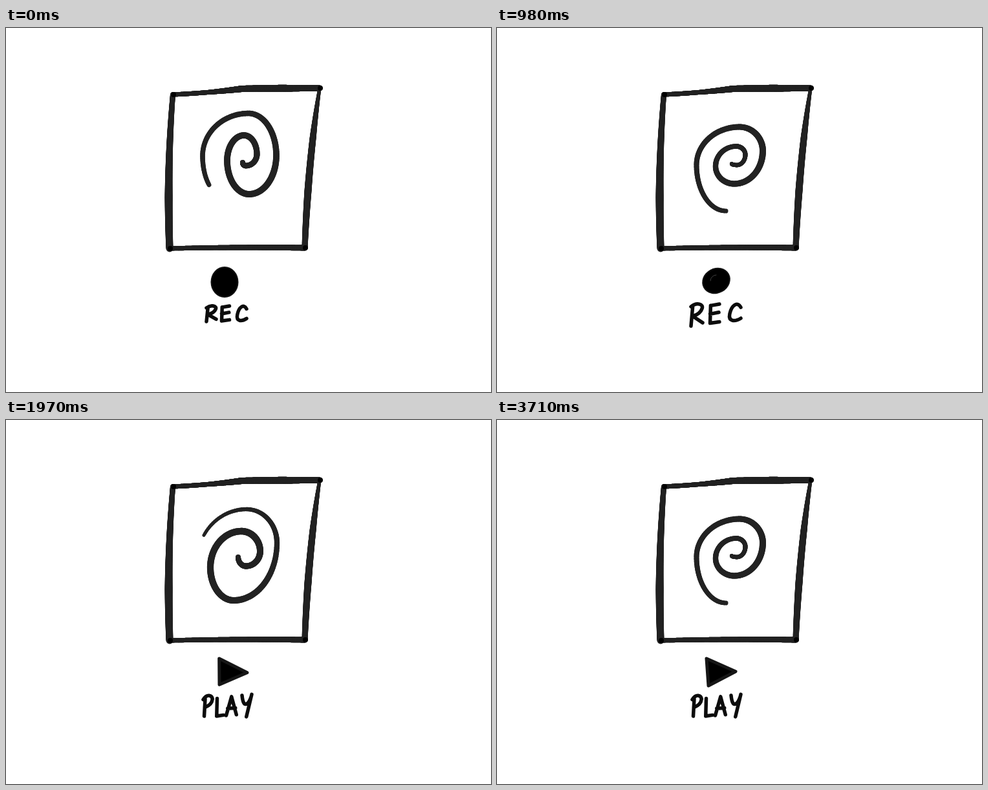
Write an HTML page with a canvas that moves like this. It is 750 px wide and 563 px high and loops after 4000 ms.

```html
<!DOCTYPE html>
<html lang="en">
<head>
<meta charset="utf-8">
<title>Record and play</title>
<style>
  html, body { margin: 0; width: 100%; height: 100%; overflow: hidden; background: #fff; }
  canvas { display: block; }
</style>
</head>
<body>
<canvas id="stage" width="750" height="563" role="img"></canvas>
<script>
const canvas = document.getElementById('stage');
const ctx = canvas.getContext('2d');
const INK = '#222', DARK = '#0c0c0c';
const mix = (a, b, f) => a + (b - a) * f;

// Draws curve(u), u = 0..1, with a line width that eases through the given widths.
function brush(curve, widths) {
  const steps = 240, spans = widths.length - 1;
  ctx.strokeStyle = INK;
  for (let s = 0; s < steps; s++) {
    const p = s / steps * spans, i = Math.floor(p);
    ctx.lineWidth = mix(widths[i], widths[i + 1], p - i);
    ctx.beginPath();
    ctx.moveTo(...curve(s / steps));
    ctx.lineTo(...curve((s + 1) / steps));
    ctx.stroke();
  }
}

function blob(x, y, rx, ry, tilt, color) {
  ctx.fillStyle = color;
  ctx.beginPath();
  ctx.ellipse(x, y, rx, ry, tilt, 0, 2 * Math.PI);
  ctx.fill();
}

// A gently bowed line from a to c that passes through b halfway.
const bow = (a, b, c) => u => [0, 1].map(k =>
  a[k] * (1 - u) * (1 - 2 * u) + b[k] * 4 * u * (1 - u) + c[k] * u * (2 * u - 1));

function drawScreen() {
  const topLeft = [258, 103], topRight = [485, 93], bottomLeft = [253, 341], bottomRight = [462, 340];
  const ridge = [365, 94];
  brush(bow(topLeft, [312, 99.5], ridge), [7, 7, 10]);
  brush(bow(ridge, [425, 93.3], topRight), [10, 11, 9]);
  brush(bow(topLeft, [252, 220], bottomLeft), [8, 10, 12, 11]);
  brush(bow(bottomLeft, [358, 339.5], bottomRight), [7, 8, 9]);
  brush(bow(topRight, [470.5, 210], bottomRight), [5, 10, 11, 9]);
  for (const [x, y] of [topLeft, topRight, bottomLeft, bottomRight]) blob(x + 1, y, 4, 4, 0, '#000');
}

// Quarter ellipses join the outermost points of each turn, which are alternately
// upright (left, right) and level (top, bottom). The first quarter begins part way in.
const spiral = (turns, firstIsLevel, start) => u => {
  const p = mix(start, turns.length - 1, u);
  const i = Math.min(Math.floor(p), turns.length - 2);
  const angle = (p - i) * Math.PI / 2;
  const [a, b] = [turns[i], turns[i + 1]];
  const ease = [1 - Math.cos(angle), Math.sin(angle)];
  const level = (i % 2 === 0) === firstIsLevel;
  return [mix(a[0], b[0], ease[level ? 1 : 0]), mix(a[1], b[1], ease[level ? 0 : 1])];
};

const spirals = [
  {
    curve: spiral([[338,261], [304,198], [375,132], [418,197], [376,257], [342,205],
      [368,166], [388,195], [371,213], [366,208]], true, .5),
    widths: [7, 10, 9.5, 8]
  },
  {
    curve: spiral([[296,218], [372,138], [419,190], [352,279], [316,228], [364,172],
      [393,203], [371,226], [359,212]], false, .33),
    widths: [5, 10, 10.5, 8]
  },
  {
    curve: spiral([[372,148], [419,205], [362,281], [305,220], [360,154], [397,195],
      [370,235], [345,207], [364,191]], true, .55),
    widths: [6, 10, 9, 7]
  },
  {
    curve: spiral([[354,283], [308.5,212], [375,153], [411,190], [367,241], [338,214],
      [370,183], [384,196], [371,212], [363,210]], true, 0),
    widths: [7, 10, 7.5, 6]
  }
];

// Handwritten letters in a unit box.
const letters = {
  R: 'M.15 .1L0 1M0 .12C.5 -.1 1.1 0 .95 .2Q.8 .45 .15 .55L1 .85',
  E: 'M.05 .08L0 1L.8 .93M.05 .08L.8 0M0 .52L.75 .43',
  C: 'M1 .2C.7 -.2 .2 .1 .05 .6C-.1 1.1 .5 1.1 1 .88',
  P: 'M.2 .17L.1 1M0 .2C.4 -.1 .9 0 .95 .17Q.9 .45 .15 .58',
  L: 'M.1 .15L.05 1L.75 .95',
  A: 'M-.3 .97L.25 .06L.75 .93M-.15 .63L.65 .6',
  Y: 'M0 0Q.1 .45 .4 .42T.95 .05M1 -.05L.45 1.03'
};

// Each next letter is shorter than the one before by shrink.
function write(word, x, y, width, height, advance, shrink = 0) {
  const line = new Path2D();
  [...word].forEach((letter, i) => {
    const box = new DOMMatrix([width, 0, 0, height - i * shrink, x + i * advance, y]);
    line.addPath(new Path2D(letters[letter]), box);
  });
  ctx.strokeStyle = DARK;
  ctx.lineWidth = 5.5;
  ctx.stroke(line);
}

// The dot flattens and tilts while its label spreads out.
function drawRecord(pose) {
  const f = pose / 3, tilt = -.5 * f;
  const rx = mix(21.5, 22.5, f), ry = mix(24, 19.5, f);
  const x = mix(338, 339, f), y = mix(393, 391, f);
  blob(x, y, rx, ry, tilt, '#111');
  blob(x, y, rx - 2, ry - 2, tilt, '#000');
  ctx.strokeStyle = `rgba(64, 64, 64, ${f})`;
  ctx.lineWidth = 1;
  ctx.beginPath();
  ctx.arc(x, y, 9, Math.PI, 1.5 * Math.PI);
  ctx.stroke();
  write('REC', mix(310, 300, f), mix(430, 427, f), mix(15, 18, f), mix(24, 34, f),
    mix(23.5, 29.5, f), mix(1, 4.5, f));
}

// Triangle and label sway sideways and bob on every other pose.
function drawPlay(pose) {
  const sway = 1.5 - 1.5 * Math.cos((pose + 1) * Math.PI / 2);
  const bob = pose % 2 ? 0 : 2;
  ctx.beginPath();
  ctx.moveTo(324 + 1.9 * sway, 369);
  ctx.lineTo(369 + 1.3 * sway, 389 + .6 * sway);
  ctx.lineTo(327 + sway, 411 - .6 * sway);
  ctx.closePath();
  ctx.fillStyle = '#000';
  ctx.fill();
  ctx.strokeStyle = '#161616';
  ctx.lineWidth = 5;
  ctx.stroke();
  write('PLAY', 302 + sway, 426 + bob, 15, 32, 20);
}

const LOOP = 4000, REC_END = 1680, REC_STEP = 140, PLAY_STEP = 290;

function render() {
  const t = performance.now() % LOOP;
  const recording = t < REC_END;
  const pose = Math.floor(recording ? t / REC_STEP : (t - REC_END) / PLAY_STEP) % 4;
  canvas.setAttribute('aria-label', recording ? 'REC' : 'PLAY');
  ctx.clearRect(0, 0, canvas.width, canvas.height);
  ctx.lineCap = ctx.lineJoin = 'round';
  drawScreen();
  brush(spirals[pose].curve, spirals[pose].widths);
  (recording ? drawRecord : drawPlay)(pose);
  requestAnimationFrame(render);
}
render();
</script>
</body>
</html>
```
